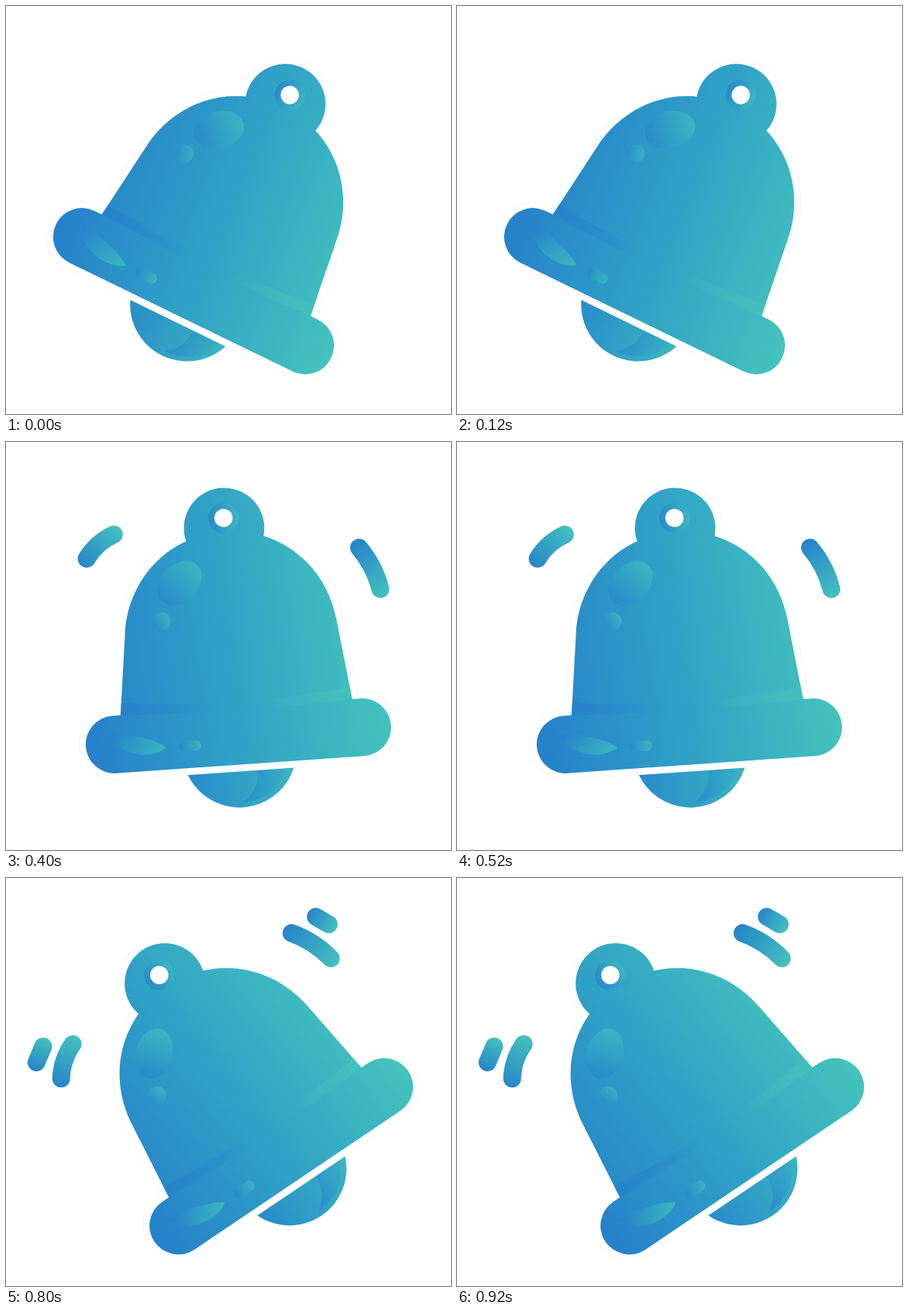
Write an HTML page that moves like this. It is 586 px wide and 538 px high and loops after 1 s.

```html
<!DOCTYPE html>
<html lang="en">
<head>
<meta charset="utf-8">
<title>Ringing bell</title>
<style>
  html, body { margin: 0; width: 100%; height: 100%; overflow: hidden; background: #fff; }
  svg { display: block; width: 100%; height: 100%; }
  .mark { fill: none; stroke-width: 23.5; stroke-linecap: round; }
</style>
</head>
<body>
<svg viewBox="0 0 586 538">
  <defs>
    <linearGradient id="skin" gradientUnits="userSpaceOnUse" x1="-198" y1="16" x2="198" y2="-16">
      <stop offset="0" stop-color="#2581ca"/>
      <stop offset=".5" stop-color="#30a2c6"/>
      <stop offset="1" stop-color="#44c2bd"/>
    </linearGradient>
    <linearGradient id="gloss">
      <stop offset="0" stop-color="#278aca"/>
      <stop offset="1" stop-color="#3cb6c1"/>
    </linearGradient>
    <linearGradient id="rise" x1="0" y1=".7" x2="1" y2=".3">
      <stop offset="0" stop-color="#288cca"/>
      <stop offset="1" stop-color="#3ab3c1"/>
    </linearGradient>
    <linearGradient id="leaf" x1="0" y1=".3" x2="1" y2=".6">
      <stop offset=".05" stop-color="#2684ca"/>
      <stop offset="1" stop-color="#3bb5c1"/>
    </linearGradient>
    <linearGradient id="shade">
      <stop offset="0" stop-color="#288dca"/>
      <stop offset="1" stop-color="#37aec3"/>
    </linearGradient>
    <linearGradient id="band" gradientUnits="userSpaceOnUse" x1="-153" y1="0" x2="153" y2="0">
      <stop offset="0" stop-color="#2581ca" stop-opacity=".75"/>
      <stop offset=".43" stop-color="#2581ca" stop-opacity="0"/>
      <stop offset=".62" stop-color="#44c2bd" stop-opacity="0"/>
      <stop offset="1" stop-color="#44c2bd" stop-opacity=".75"/>
    </linearGradient>
    <linearGradient id="left" gradientUnits="userSpaceOnUse" x1="-194" y1="-238" x2="-136" y2="-284">
      <stop offset="0" stop-color="#2683ca"/>
      <stop offset="1" stop-color="#43c1bd"/>
    </linearGradient>
    <linearGradient id="left2" href="#left" x1="-208" y1="-276" x2="-169" y2="-302"/>
    <linearGradient id="right" href="#left" x1="171" y1="-247" x2="204" y2="-169"/>
    <linearGradient id="right2" href="#left" x1="209" y1="-247" x2="228" y2="-208"/>
    <g id="shape">
      <path d="M-153-37 L-139.5-145 C-131-215 -75-270 0-270 S131-215 139.5-145 L153-37Z"/>
      <circle cx=".4" cy="-274.7" r="53"/>
      <rect x="-201.5" y="-38" width="403" height="76" rx="38"/>
    </g>
  </defs>

  <g id="bell">
    <circle cy="19.5" r="75" fill="url(#gloss)"/>
    <path d="M23 44 C22 65 15 78 0 88 C32 87 56 69 59 44Z" fill="url(#shade)"/>

    <use href="#shape" fill="#fff" stroke="#eef6fb" stroke-width="18"/>
    <use href="#shape" fill="#fff" stroke="#fff" stroke-width="16.6"/>
    <use href="#shape" fill="url(#skin)"/>
    <path d="M-151-54 Q0-36 151-54 L153-38 Q0-30 -153-38Z" fill="url(#band)"/>

    <circle cx=".5" cy="-288" r="20" fill="url(#gloss)"/>
    <circle cx=".5" cy="-288" r="12" fill="#fff"/>

    <ellipse rx="33.5" ry="24.3" transform="translate(-63.2 -206) rotate(-41)" fill="url(#gloss)"/>
    <circle cx="-90.4" cy="-157.8" r="12" fill="url(#rise)"/>
    <path d="M-172-14 C-150-14 -112-5 -95.6 8.7 C-105 18 -150 26 -172-14Z" fill="url(#leaf)"/>
    <rect x="-79" y="1.8" width="29" height="14" rx="7" fill="url(#gloss)"/>

    <g id="near" class="mark">
      <path d="M-183-247 Q-169-267 -145-276.3" stroke="url(#left)"/>
      <path d="M175.8-236.5 Q194.5-211 200-180" stroke="url(#right)"/>
    </g>
    <g id="far" class="mark">
      <path d="M-198-283 L-179-295.4" stroke="url(#left2)"/>
      <path d="M214.4-236.5 L222.9-218.7" stroke="url(#right2)"/>
    </g>
  </g>
</svg>
<script>
  const LOOP = 1000;
  // x, y of the rim centre, tilt in degrees, sets of motion marks shown
  const poses = [
    [247, 376, 26, 0],
    [276, 374, 11, 0],
    [306, 387.5, -4, 1],
    [337.5, 383.5, -19, 1],
    [362.5, 367, -34, 2]
  ];
  const [bell, near, far] = ['bell', 'near', 'far'].map(id => document.getElementById(id));
  const show = (el, on) => el.setAttribute('visibility', on ? 'visible' : 'hidden');

  function draw(time) {
    const step = Math.floor(time % LOOP / LOOP * poses.length);
    const [x, y, tilt, marks] = poses[step];
    bell.setAttribute('transform', `translate(${x} ${y}) rotate(${tilt})`);
    show(near, marks > 0);
    show(far, marks > 1);
  }

  const start = performance.now();
  function tick() {
    draw(performance.now() - start);
    requestAnimationFrame(tick);
  }
  tick();
</script>
</body>
</html>
```
